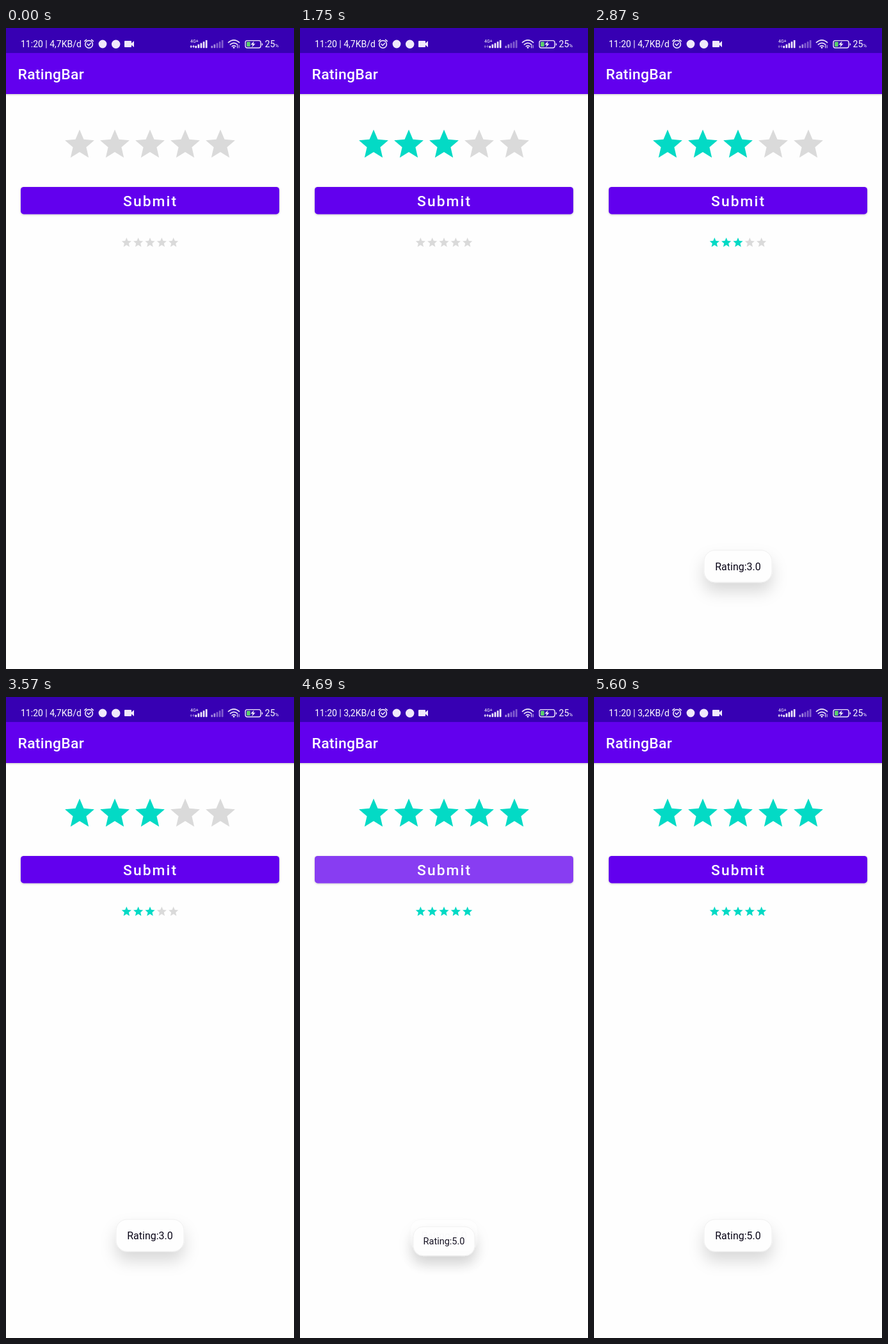
An HTML page for the animation above (6230 ms loop, 450x1000 px).

```html
<!DOCTYPE html>
<html lang="en">
<head>
<meta charset="utf-8">
<title>RatingBar</title>
<style>
html, body { margin: 0; width: 100%; height: 100%; overflow: hidden; background: #fefefe; }
svg { display: block; width: 450px; height: 1000px; }
text { font-family: Roboto, sans-serif; fill: #fff; white-space: pre; }
.line { fill: none; stroke: #f0e9fb; stroke-width: 1.6; stroke-linecap: round; stroke-linejoin: round; }
.solid { fill: #f0e9fb; }
.off { fill: #dadada; }
.on { fill: #03dac5; }
</style>
</head>
<body>
<svg viewBox="0 0 450 1000" xmlns="http://www.w3.org/2000/svg">
  <defs>
    <path id="star" d="M12 17.27 18.18 21l-1.64-7.03L22 9.24l-7.19-.61L12 2 9.19 8.63 2 9.24l5.46 4.73L5.82 21z"/>
    <clipPath id="buttonClip"><rect x="23" y="248" width="404" height="42.4" rx="4.6"/></clipPath>
    <filter id="barShadow" x="-10%" y="-10%" width="120%" height="140%">
      <feDropShadow dx="0" dy="1" stdDeviation="1.4" flood-color="#000" flood-opacity=".22"/>
    </filter>
    <filter id="toastShadow" x="-50%" y="-50%" width="200%" height="260%">
      <feDropShadow dx="0" dy="14" stdDeviation="12" flood-color="#000" flood-opacity=".15"/>
    </filter>
  </defs>

  <rect width="450" height="1000" fill="#fefefe"/>
  <rect x="-10" y="30" width="470" height="73" fill="#6200ee" filter="url(#barShadow)"/>
  <rect width="450" height="39" fill="#3700b3"/>

  <g id="status">
    <text id="clock" x="23" y="30" font-size="14"></text>
    <g class="line">
      <circle cx="129.6" cy="25.4" r="5.8"/>
      <path d="M127 25l2.2 2.2 3.2-3.4M122.8 20.6l2.8-2.3M136.4 20.6l-2.8-2.3"/>
    </g>
    <circle class="solid" cx="151" cy="25" r="6.4"/>
    <circle class="solid" cx="171.7" cy="25.2" r="6.7"/>
    <path class="solid" d="M186 20h9q1 0 1 1v2.8l4-3.5v9.6l-4-3.5V29q0 1-1 1h-9q-1 0-1-1v-8q0-1 1-1z"/>
    <text x="288" y="23" font-size="7">4G+</text>
    <g id="arrows" class="solid">
      <path d="M287.2 29.2l2-2.4 2 2.4h-1.3V31h-1.4v-1.8z"/>
      <path d="M291 28.6l2 2.4 2-2.4h-1.3v-1.8h-1.4v1.8z"/>
    </g>
    <g id="signal" class="solid"></g>
    <g class="line" stroke-width="2">
      <path d="M347.4 22.6q8.6-7.4 17.2 0M350.3 25.8q5.7-4.8 11.4 0M353.2 28.6q2.8-2.2 5.6 0"/>
      <path d="M361.5 27v4M364 31v-4" style="stroke-width:1"/>
    </g>
    <circle class="solid" cx="356" cy="30.6" r="1.4"/>
    <rect class="line" x="374" y="19.6" width="24" height="11.4" rx="3" style="stroke-width:1.4"/>
    <rect x="376" y="21.6" width="5.6" height="7.4" rx="1" fill="#5ccf6c"/>
    <path class="solid" d="M399.6 23.4q1.6 0 1.6 2t-1.6 2zM387.5 20.6l-5.2 5.5h3.1l-1.2 4.2 5.4-5.8h-3.2z"/>
    <text x="404.6" y="30" font-size="14">25</text>
    <text x="420.2" y="30" font-size="8">%</text>
  </g>

  <text x="18.6" y="80" font-size="22.9" font-weight="500" letter-spacing=".29">RatingBar</text>
  <g id="bigStars"></g>

  <rect x="23" y="248" width="404" height="42.4" rx="4.6" fill="#6200ee" filter="url(#barShadow)"/>
  <g clip-path="url(#buttonClip)"><circle id="ripple" cy="269.5" fill="#fff"/></g>
  <text x="183" y="278" font-size="22.9" font-weight="500" letter-spacing="2.05">Submit</text>
  <g id="smallStars"></g>
  <g id="toasts"></g>
</svg>

<script>
const LOOP = 6230, STEP = 70;
const FIRST_RATE = 1330, SECOND_RATE = 3640, SPEED_CHANGE = 4130;
const PRESSES = [2380, 4480], CLICK = 140;

// [ms after press, centre x, radius, opacity]
const RIPPLE = [[0, 145, 147, .165], [70, 200, 205, .22], [140, 225, 240, .24],
  [210, 225, 240, .24], [280, 225, 240, .14], [350, 225, 240, .05], [420, 225, 240, 0]];
// [ms after press, scale, shift y, opacity]
const TOAST = [[70, .84, 15, 0], [140, .86, 13, .4], [210, .906, 9, .95], [280, .965, 4, 1],
  [350, .992, .6, 1], [420, 1, -.5, 1], [560, 1, 0, 1]];

const $ = id => document.getElementById(id);

function add(parent, tag, attrs) {
  const el = document.createElementNS('http://www.w3.org/2000/svg', tag);
  for (const key in attrs) el.setAttribute(key, attrs[key]);
  return parent.appendChild(el);
}

function set(el, attrs) {
  for (const key in attrs) el.setAttribute(key, attrs[key]);
}

function sample(table, t) {
  const next = table.findIndex(row => row[0] >= t);
  if (next < 0) return table[table.length - 1].slice(1);
  if (next === 0) return table[0].slice(1);
  const a = table[next - 1], b = table[next];
  const k = (t - a[0]) / (b[0] - a[0]);
  return a.slice(1).map((v, i) => v + (b[i + 1] - v) * k);
}

function starRow(id, pitch, top) {
  const scale = pitch / 24;
  return [0, 1, 2, 3, 4].map(i => add($(id), 'use', {
    href: '#star',
    transform: `translate(${225 + (i - 2.5) * pitch} ${top}) scale(${scale})`
  }));
}

function makeToast(label) {
  const g = add($('toasts'), 'g', {});
  add(g, 'rect', { x: -53, y: -25, width: 106, height: 50, rx: 17, fill: '#fefefe',
    stroke: '#ebebeb', 'stroke-width': .8, filter: 'url(#toastShadow)' });
  add(g, 'text', { x: 0, y: 6, 'font-size': 16, 'text-anchor': 'middle',
    style: 'fill:#0a0618' }).textContent = label;
  return g;
}

function signalBars(x, opacity) {
  for (let i = 0; i < 5; i++) {
    const h = 3.4 + i * 2.2;
    add($('signal'), 'rect', { x: x + i * 4.1, y: 31.2 - h, width: 2.7, height: h, rx: .6,
      opacity: opacity(i) });
  }
}

signalBars(295.4, () => 1);
signalBars(320.4, i => i < 2 ? .6 : .4);
const big = starRow('bigStars', 55, 154);
const small = starRow('smallStars', 18.33, 325.4);
const toasts = ['Rating:3.0', 'Rating:5.0'].map(makeToast);

const paint = (row, count) =>
  row.forEach((star, i) => star.setAttribute('class', i < count ? 'on' : 'off'));

function drawToast(i, t) {
  let [scale, dy, alpha] = sample(TOAST, t - PRESSES[i]);
  if (i === 0) {
    const out = (t - PRESSES[1] - CLICK + STEP) / 210;
    alpha *= 1 - Math.min(1, Math.max(0, out));
  }
  set(toasts[i], { transform: `translate(225 ${840 + dy}) scale(${scale})`, opacity: alpha });
}

function draw(t) {
  $('clock').textContent = `11:20 | ${t < SPEED_CHANGE ? '4,7' : '3,2'}KB/d`;
  $('arrows').setAttribute('opacity', t >= 700 && t < SPEED_CHANGE ? .45 : .95);

  paint(big, t < FIRST_RATE ? 0 : t < SECOND_RATE ? 3 : 5);
  paint(small, t < PRESSES[0] + CLICK ? 0 : t < PRESSES[1] + CLICK ? 3 : 5);

  const press = t < PRESSES[1] ? PRESSES[0] : PRESSES[1];
  const [cx, r, opacity] = sample(RIPPLE, t - press);
  set($('ripple'), { cx, r, opacity: t < press ? 0 : opacity });

  toasts.forEach((_, i) => drawToast(i, t));
}

const start = performance.now();
function tick(now) {
  const t = Math.max(0, now - start) % LOOP;
  draw(Math.floor(t / STEP) * STEP);
  requestAnimationFrame(tick);
}
draw(0);
requestAnimationFrame(tick);
</script>
</body>
</html>
```
